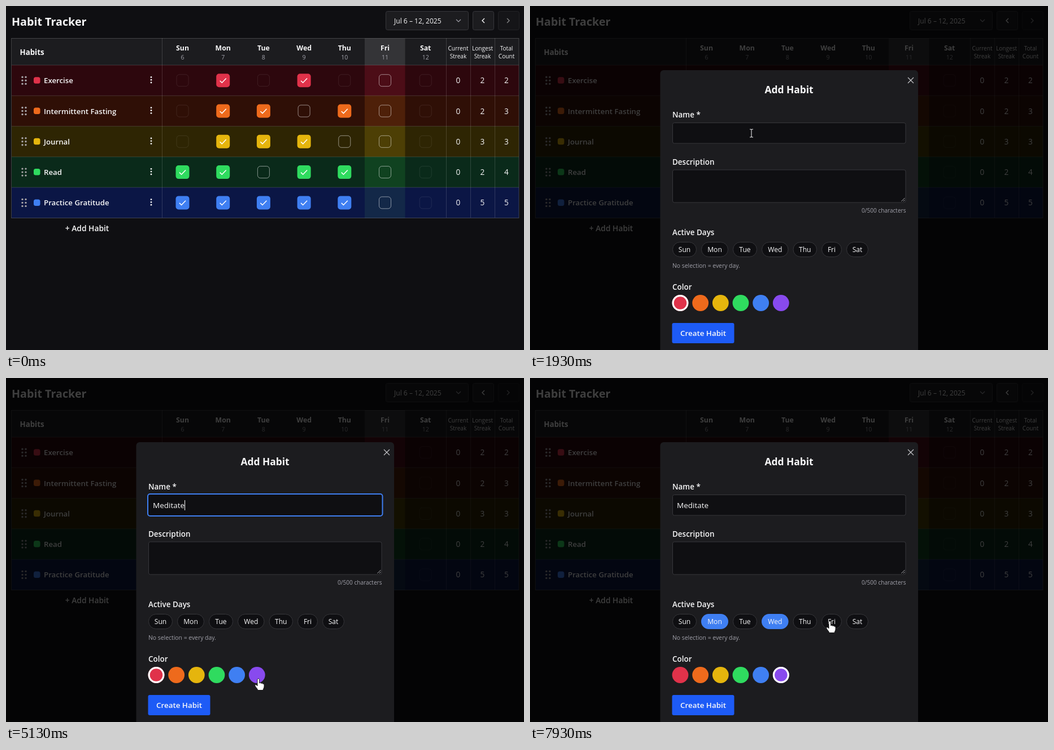
Animation of 917 by 611 pixels, one loop 8000 ms. Source, as an HTML page:

```html
<!DOCTYPE html>
<html lang="en">
<head>
<meta charset="utf-8">
<title>Habit Tracker</title>
<style>
  html, body { margin: 0; width: 100%; height: 100%; overflow: hidden; background: #0f0f12; }
  svg { display: block; width: 917px; height: 611px; font-family: "Open Sans", "Noto Sans", sans-serif; }
  text { white-space: pre; }
</style>
</head>
<body>
<svg id="stage" viewBox="0 0 917 611"></svg>
<script>
const NS = 'http://www.w3.org/2000/svg';
const stage = document.getElementById('stage');
const LOOP = 8000;

const PAGE = '#0f0f12', PANEL = '#1c1c1f', LINE = '#37373b';
const WHITE = '#f8f8f9', GRAY = '#a1a1aa', BLUE = '#3f7ff2';
const COLORS = ['#e0324a', '#ee6a1c', '#e5b50d', '#2fdb5f', BLUE, '#884aee'];
const DAYS = ['Sun', 'Mon', 'Tue', 'Wed', 'Thu', 'Fri', 'Sat'];

// In marks: c = checked, o = open, d = disabled
const HABITS = [
  { name: 'Exercise', bg: '#2d070d', today: '#4c0d17', marks: 'dcdcdod', stats: [0, 2, 2] },
  { name: 'Intermittent Fasting', bg: '#2f0f06', today: '#4e2009', marks: 'dccocod', stats: [0, 2, 3] },
  { name: 'Journal', bg: '#2e2503', today: '#4d3f05', marks: 'dcccood', stats: [0, 3, 3] },
  { name: 'Read', bg: '#0a2a1a', today: '#104220', marks: 'ccoccod', stats: [0, 2, 4] },
  { name: 'Practice Gratitude', bg: '#0b1645', today: '#132848', marks: 'cccccod', stats: [0, 5, 5] }
];

function el(parent, tag, attrs) {
  const node = document.createElementNS(NS, tag);
  for (const k in attrs) node.setAttribute(k, attrs[k]);
  return parent.appendChild(node);
}
const group = (parent, attrs) => el(parent, 'g', attrs);
const rect = (parent, x, y, width, height, fill, more) =>
  el(parent, 'rect', { x, y, width, height, fill, ...more });
const dot = (parent, cx, cy, r, fill, more) => el(parent, 'circle', { cx, cy, r, fill, ...more });
const stroke = (parent, d, color, width = 1, more) =>
  el(parent, 'path', { d, fill: 'none', stroke: color, 'stroke-width': width, ...more });
function text(parent, str, x, y, size, weight = 400, fill = WHITE, anchor = 'start') {
  const node = el(parent, 'text', {
    x, y, fill, 'font-size': size, 'font-weight': weight, 'text-anchor': anchor
  });
  node.textContent = str;
  return node;
}

// Page

function drawToolbar(g) {
  const box = { rx: 3, stroke: LINE };
  text(g, 'Habit Tracker', 10, 35, 19.7, 700);
  rect(g, 672.5, 9.5, 146, 33, PANEL, box);
  text(g, 'Jul 6 – 12, 2025', 687, 30.5, 12.1, 500);
  stroke(g, 'M797 24l4 4l4-4', GRAY, 1.2);
  rect(g, 826.5, 9.5, 37, 33, PANEL, box);
  stroke(g, 'M847 22l-4 4l4 4', WHITE, 1.4);
  const next = group(g, { opacity: 0.5 });
  rect(next, 871.5, 9.5, 37, 33, PANEL, box);
  stroke(next, 'M887 22l4 4l-4 4', WHITE, 1.4);
}

const dayX = i => 312.5 + 71.7 * i;
const STAT_X = [800.5, 843.5, 886];
const TOP = 105, ROW = 54.3;

function drawCheck(g, x, y, mark, color) {
  if (mark === 'c') {
    rect(g, x - 12, y - 12, 24, 24, color, { rx: 5 });
    stroke(g, `M${x - 5.5} ${y + 0.5}l3.6 3.6l7.4-7.8`, '#fff', 1.5);
  } else {
    rect(g, x - 10.5, y - 10.5, 21, 21, 'none', {
      rx: 5, stroke: '#fff', 'stroke-opacity': mark === 'o' ? 0.5 : 0.09
    });
  }
}

function drawRow(g, habit, i) {
  const y = TOP + ROW * i, mid = y + 27.2;
  rect(g, 10, y, 898, ROW, habit.bg);
  rect(g, 635, y, 71.5, ROW, habit.today);
  for (const dx of [29, 35])
    for (const dy of [-6, 0, 6]) dot(g, dx, mid + dy, 1.7, '#a8a5a8');
  rect(g, 49, mid - 6, 11.5, 11.5, COLORS[i], { rx: 3.5 });
  text(g, habit.name, 67, mid + 5, 13.25, 600);
  for (const dy of [-5.8, -1, 3.8]) dot(g, 257, mid + dy, 1.4, WHITE);
  [...habit.marks].forEach((m, d) => drawCheck(g, dayX(d), mid, m, COLORS[i]));
  habit.stats.forEach((n, s) => text(g, n, STAT_X[s], mid + 5, 13.6, 500, WHITE, 'middle'));
  stroke(g, `M10 ${y}H908`, '#fff', 1, { opacity: 0.15 });
}

function drawTable(g) {
  rect(g, 10, 57.5, 898, 48, PANEL);
  rect(g, 635, 57.5, 71.5, 48, '#343437');
  text(g, 'Habits', 24.5, 86.5, 13.3, 700);
  DAYS.forEach((day, i) => {
    text(g, day, dayX(i), 79, 12.3, 700, WHITE, 'middle');
    text(g, 6 + i, dayX(i), 94.5, 10.6, 500, GRAY, 'middle');
  });
  [['Current', 'Streak'], ['Longest', 'Streak'], ['Total', 'Count']].forEach((words, s) =>
    words.forEach((w, k) => text(g, w, STAT_X[s], 79 + 14 * k, 10.1, 400, WHITE, 'middle')));
  HABITS.forEach((h, i) => drawRow(g, h, i));
  stroke(g, 'M276.5 57V376M779.5 57V376M822.5 57V376M865.5 57V376', '#fff', 1, { opacity: 0.15 });
  rect(g, 9.5, 57.5, 898.5, 319, 'none', { stroke: '#fff', 'stroke-opacity': 0.2 });
  text(g, '+ Add Habit', 143.5, 400, 13.8, 600, WHITE, 'middle');
}

rect(stage, 0, 0, 917, 611, PAGE);
const page = group(stage);
drawToolbar(page);
drawTable(page);
const shade = rect(stage, 0, 0, 917, 611, '#000');

// Dialog

const dialog = group(stage);
const label = (str, y) => text(dialog, str, 252, y, 13.45, 600);

rect(dialog, 230.5, 114, 456.5, 520, PANEL, { rx: 6 });
text(dialog, 'Add Habit', 458.5, 155, 17.4, 700, WHITE, 'middle');
stroke(dialog, 'M669 127l10 10M679 127l-10 10', '#c4c4c8', 1.2);

label('Name *', 198);
const field = rect(dialog, 252.5, 207.5, 412.5, 36.5, PAGE, { rx: 3, stroke: LINE });
const ring = rect(dialog, 251, 206, 415.5, 39, PAGE, { rx: 4, stroke: BLUE, 'stroke-width': 2 });
const value = text(dialog, '', 260, 231, 13.5);
const caret = rect(dialog, 0, 217, 1, 18, '#fff');

label('Description', 282);
rect(dialog, 252.5, 291, 412.5, 58, PAGE, { rx: 3, stroke: LINE });
stroke(dialog, 'M657.5 347l6-6M661 347l2.5-2.5', '#b4b4b8');
text(dialog, '0/500 characters', 665.5, 366.5, 10.1, 400, GRAY, 'end');

label('Active Days', 406.5);
const PILLS = [[252, 43], [303, 48], [359, 43], [410, 47.5], [465.5, 42.5], [516, 36], [560, 39]];
const pills = PILLS.map(([x, w], i) => {
  rect(dialog, x + 0.5, 419.5, w - 1, 26, PAGE, { rx: 13, stroke: LINE });
  const on = rect(dialog, x, 419, w, 27, BLUE, { rx: 13.5 });
  text(dialog, DAYS[i], x + w / 2, 437, 12.1, 400, WHITE, 'middle');
  return on;
});
text(dialog, 'No selection = every day.', 252, 464.5, 10.4, 400, GRAY);

label('Color', 504);
const swatchX = i => 266 + 35.66 * i;
const rings = COLORS.map((color, i) => {
  dot(dialog, swatchX(i), 527.5, 14.4, color);
  return dot(dialog, swatchX(i), 527.5, 12.9, color, { stroke: '#fff', 'stroke-width': 3.2 });
});
rect(dialog, 251.5, 563, 110, 36, '#1d5bf6', { rx: 3 });
text(dialog, 'Create Habit', 306.5, 586, 13.4, 600, WHITE, 'middle');

// Pointer

const pointer = group(stage);
const shape = { fill: '#fff', stroke: '#111', 'stroke-width': 0.9, 'stroke-linejoin': 'round' };
const cursors = {
  arrow: el(pointer, 'path', { d: 'M0 0V15L3.5 11.8L5.8 17L8 16L5.8 11H10.5Z', ...shape }),
  hand: el(pointer, 'path', {
    d: 'M-2 1.6C-2-.4 1.6-.4 1.6 1.6V8C2.2 6.8 4.6 7 4.8 8.6C5.6 7.6 7.6 8 7.7 9.4' +
       'C8.6 8.8 10 9.4 10 10.8V14C10 17 8.2 17.6 8 20.5H-1.2C-1.6 17.8-5.8 14.6-6.2 12.2' +
       'C-6.4 10.6-4.4 10.2-3.4 11.4L-2 12.8Z', ...shape
  }),
  beam: stroke(pointer, 'M-3-7H-1L0-6L1-7H3M0-6V6M-3 7H-1L0 6L1 7H3', '#e8e8ea', 1.1)
};

const PATH = [
  [70, 215, 612], [640, 148, 390], [1150, 148, 390], [1850, 392, 226], [4330, 392, 226],
  [5000, 447, 534], [5450, 447, 534], [6200, 333, 438], [6750, 333, 438],
  [7150, 433, 437], [7450, 433, 437], [7850, 531, 432], [LOOP, 531, 432]
];
const OPEN = 815, FOCUS = 2050, PICK = 5330, MON = 6420, WED = 7280;
const TYPE = 2620, KEY = 170, WORD = 'Meditate', BLINK = 530;

const ramp = (t, start, length) => Math.min(1, Math.max(0, (t - start) / length));
const ease = p => p * p * (3 - 2 * p);
const show = (node, on) => node.setAttribute('visibility', on ? 'inherit' : 'hidden');
const inside = (x, y, left, top, w, h) => x >= left && x <= left + w && y >= top && y <= top + h;

function pointerAt(t) {
  const i = Math.max(1, PATH.findIndex(k => t < k[0]));
  const [t0, x0, y0] = PATH[i - 1], [t1, x1, y1] = PATH[i];
  const p = ease(ramp(t, t0, t1 - t0));
  return [x0 + (x1 - x0) * p, y0 + (y1 - y0) * p];
}

function cursorFor(x, y, t) {
  if (t < OPEN) return inside(x, y, 96, 382, 96, 26) ? 'hand' : 'arrow';
  if (inside(x, y, 252, 207, 413, 37) || inside(x, y, 252, 291, 413, 58)) return 'beam';
  const onPill = PILLS.some(([left, w]) => inside(x, y, left, 419, w, 27));
  const onSwatch = COLORS.some((c, i) => Math.hypot(x - swatchX(i), y - 527.5) < 14.5);
  return onPill || onSwatch ? 'hand' : 'arrow';
}

function render(t) {
  const open = ease(ramp(t, OPEN, 120));
  shade.setAttribute('opacity', 0.75 * open);
  dialog.setAttribute('opacity', open);
  const s = 0.95 + 0.05 * open;
  dialog.setAttribute('transform', `translate(458.5 370) scale(${s}) translate(-458.5 -370)`);

  const focused = t >= FOCUS && t < PICK;
  show(field, !focused);
  show(ring, focused);
  const typed = Math.min(WORD.length, Math.max(0, Math.floor((t - TYPE) / KEY) + 1));
  value.textContent = WORD.slice(0, typed);
  const lastKey = typed ? TYPE + (typed - 1) * KEY : FOCUS;
  show(caret, focused && Math.floor((t - lastKey) / BLINK) % 2 === 0);
  caret.setAttribute('x', 260 + (typed ? value.getComputedTextLength() : 0));

  const picked = t < PICK ? 0 : 5;
  rings.forEach((r, i) => show(r, i === picked));
  pills.forEach((p, i) =>
    p.setAttribute('opacity', i === 1 ? ramp(t, MON, 150) : i === 3 ? ramp(t, WED, 150) : 0));

  const [x, y] = pointerAt(t);
  const kind = cursorFor(x, y, t);
  show(pointer, t >= 70);
  pointer.setAttribute('transform', `translate(${x} ${y})`);
  for (const k in cursors) show(cursors[k], k === kind);
}

const start = performance.now();
function tick() {
  render((performance.now() - start) % LOOP);
  requestAnimationFrame(tick);
}
tick();
</script>
</body>
</html>
```
